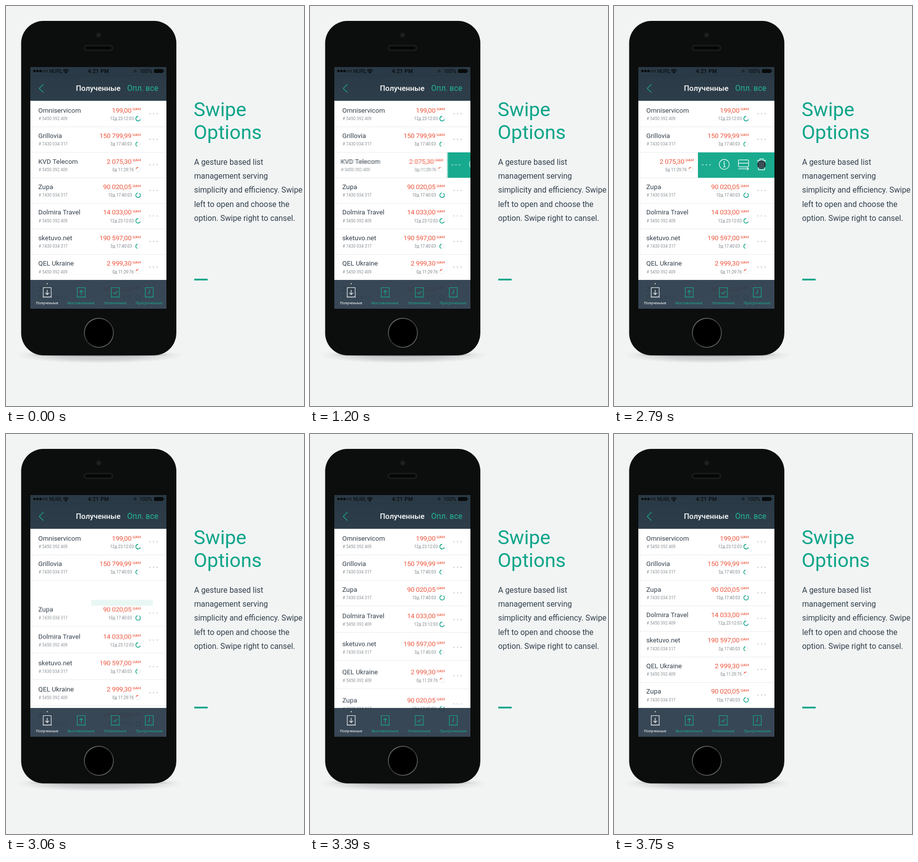
Recreate the animation shown at these times as an HTML page with a canvas. Size 600 px wide and 806 px high, loop 5310 ms.

```html
<!DOCTYPE html>
<html lang="en">
<head>
<meta charset="utf-8">
<title>Swipe Options</title>
<style>
html, body { margin: 0; width: 100%; height: 100%; overflow: hidden; background: #f2f4f4; }
canvas { display: block; width: 600px; height: 806px; }
</style>
</head>
<body>
<canvas id="stage"></canvas>
<script>
const W = 600, H = 806, LOOP = 5310, STEP = 30;
const LEFT = 49, RIGHT = 323, TOP = 191, ROW = 192, BAR = 552, BOTTOM = 610, PITCH = 51.45, SWIPE = 111;
const TEAL = '#0fa58a', GREEN = '#1aab8f', RED = '#ee5840', FONT = 'Roboto, "Open Sans", sans-serif';
const scale = window.devicePixelRatio || 1;

const makeCtx = canvas => {
  canvas.width = W * scale;
  canvas.height = H * scale;
  const c = canvas.getContext('2d');
  c.scale(scale, scale);
  return c;
};
const ctx = makeCtx(document.getElementById('stage'));
const buf = makeCtx(document.createElement('canvas'));

const clamp = x => Math.min(1, Math.max(0, x));
const span = (t, a, b) => clamp((t - a) / (b - a));
const mix = (a, b, p) => a + (b - a) * p;
const quad = u => u < .5 ? 2 * u * u : 1 - 2 * (1 - u) ** 2;
const cubic = u => u < .5 ? 4 * u ** 3 : 1 - 4 * (1 - u) ** 3;

function text(c, str, x, y, size, color, weight = 400, align = 'left', spacing = 0) {
  c.font = `${weight} ${size}px ${FONT}`;
  c.letterSpacing = spacing + 'px';
  c.textAlign = align;
  c.fillStyle = color;
  c.fillText(str, x, y);
}

function line(c, points, color, width = 1, close = false) {
  c.beginPath();
  points.forEach(([x, y]) => c.lineTo(x, y));
  if (close) c.closePath();
  c.strokeStyle = color;
  c.lineWidth = width;
  c.stroke();
}

function disc(c, x, y, r, color) {
  c.beginPath();
  c.arc(x, y, r, 0, Math.PI * 2);
  c.fillStyle = color;
  c.fill();
}

function arc(c, x, y, r, from, to, color, width) {
  c.beginPath();
  c.arc(x, y, r, from * Math.PI, to * Math.PI);
  c.strokeStyle = color;
  c.lineWidth = width;
  c.stroke();
}

function box(c, x, y, w, h, r, fill, stroke, width = 1) {
  c.beginPath();
  c.roundRect(x, y, w, h, r);
  if (fill) { c.fillStyle = fill; c.fill(); }
  if (stroke) { c.strokeStyle = stroke; c.lineWidth = width; c.stroke(); }
}

function dots(c, x, y, color) {
  for (let k = -1; k < 2; k++) disc(c, x + k * 7.3, y, 1.1, color);
}

// Time left: label, ring arc (in units of pi), ring colour
const LONG = ['12д 23:12:03', .1, 1.5, TEAL];
const MID = ['3д 17:40:03', .65, 1.4, TEAL];
const LATE = ['0д 11:29:76', 1.15, 1.5, RED];
const FULL = ['10д 17:40:03', -.3, 1.45, TEAL];
const ROWS = [
  ['Omniservicom', '199,00', LONG],
  ['Grillovia', '150 799,99', MID],
  ['KVD Telecom', '2 075,30', LATE],
  ['Zupa', '90 020,05', FULL],
  ['Dolmira Travel', '14 033,00', LONG],
  ['sketuvo.net', '190 597,00', MID],
  ['QEL Ukraine', '2 999,30', LATE],
  ['Zupa', '90 020,05', FULL]
];

function rowText(c, i, y, dx = 0, dotColor = '#b4bac0') {
  const [name, sum, [left, from, to, color]] = ROWS[i];
  const odd = i % 2;
  text(c, name, 65 + dx, y + 22.6, 13.3, '#34414d');
  text(c, odd ? '# 7430 034 317' : '# 5450 392 409', 65.6 + dx, y + 38, 8.4, '#8b9197');
  text(c, sum, 252.5 + dx, y + 22.6, 13.6, RED, 400, 'right', -.28);
  text(c, 'UAH', 255 + dx, y + 18.3, 8, RED, 500, 'left', .2);
  text(c, left, (odd ? 253.5 : 257.3) + dx, y + 38, 8.2, '#7f868c', 400, 'right');
  arc(c, 266 + dx, y + 35, 4.6, 0, 2, '#e4e8ea', 1);
  arc(c, 266 + dx, y + 35, 4.6, from, to, color, 1.6);
  dots(c, 297 + dx, y + 25.2, dotColor);
}

function infoIcon(c, x, y) {
  arc(c, x, y, 10, 0, 2, '#fff', 1.2);
  disc(c, x, y - 5, 1.2, '#fff');
  line(c, [[x - 2, y - 2], [x + .3, y - 2], [x + .3, y + 5]], '#fff', 1.3);
  line(c, [[x - 2.3, y + 5.2], [x + 2.8, y + 5.2]], '#fff', 1.1);
}

function cardIcon(c, x, y) {
  box(c, x - 10, y - 9, 20.5, 14, 1.5, null, '#fff', 1.2);
  line(c, [[x - 10, y - 2.5], [x + 10.5, y - 2.5]], '#fff', 1.2);
  line(c, [[x - 10, y + 9], [x + 10.5, y + 9]], '#fff', 1.2);
  line(c, [[x + 7, y + 6.2], [x + 10.5, y + 9], [x + 7, y + 11.8]], '#fff', 1.1);
}

function trashIcon(c, x, y, pressed) {
  line(c, [[x - 8.5, y - 8], [x + 8.5, y - 8]], '#fff', 1.2);
  line(c, [[x - 3.5, y - 8], [x - 3.5, y - 11], [x + 3.5, y - 11], [x + 3.5, y - 8]], '#fff', 1.1);
  line(c, [[x - 7, y - 8], [x - 6, y + 11], [x + 6, y + 11], [x + 7, y - 8]], '#fff', 1.2);
  if (pressed) disc(c, x, y + .5, 8.6, '#2b3b46');
  for (let k = -1; k < 2; k++)
    line(c, [[x + k * 3.4, y - 5], [x + k * 3.1, y + 8]], pressed ? '#64817f' : '#fff', 1);
}

function swipedRow(c, t) {
  const y = ROW + 2 * PITCH, low = y + PITCH;
  const slide = end => SWIPE * cubic(span(t, 1150, end));
  const dx = -slide(1410), edge = 280 + dx;
  const shown = span(t, 870, 1140), gone = span(t, 2880, 3078);
  if (gone === 1) return;

  const ink = 1 - span(t, 2880, 2990);
  c.save();
  c.globalAlpha = ink;
  rowText(c, 2, y, dx);
  line(c, [[LEFT, low], [RIGHT, low]], '#e8ebed');
  c.restore();
  if (!shown) return;

  // The open panel folds down onto its lower edge
  const fold = quad(gone);
  c.save();
  c.globalAlpha = shown * (1 - gone);
  c.translate(mix(edge, edge + 3, fold), low);
  c.scale(mix(1, .8, fold), mix(1, .22, fold));
  c.translate(-edge, -low);
  c.beginPath();
  c.rect(edge, y, RIGHT - edge, PITCH);
  c.clip();
  c.fillStyle = GREEN;
  c.fillRect(edge, y, RIGHT - edge, PITCH);
  c.globalAlpha *= ink;
  dots(c, 297 + dx, y + 25.2, '#fff');
  infoIcon(c, 222 + SWIPE - slide(1470), y + 24.2);
  cardIcon(c, 260.5 + SWIPE - slide(1525), y + 24.2);
  trashIcon(c, 297 + SWIPE - slide(1580), y + 24.2, t >= 2780);
  c.restore();
}

function list(c, t) {
  c.save();
  c.beginPath();
  c.rect(LEFT, TOP, RIGHT - LEFT, BOTTOM - TOP);
  c.clip();
  c.fillStyle = '#fff';
  c.fillRect(LEFT, TOP, RIGHT - LEFT, BOTTOM - TOP);
  ROWS.forEach((_, i) => {
    if (i === 2) return;
    const lag = 88 * (i - 3);
    const rise = i > 2 ? PITCH * quad(span(t, 2905, 3385 + lag)) : 0;
    const y = ROW + i * PITCH - rise;
    rowText(c, i, y);
    line(c, [[LEFT, y + PITCH], [RIGHT, y + PITCH]], '#e8ebed');
  });
  swipedRow(c, t);
  c.restore();
}

// Averages several moments of the list while it moves
function blurredList(t) {
  const moving = (t >= 1140 && t < 1600) || (t > 2860 && t < 3750);
  const n = moving ? 6 : 1, w = RIGHT - LEFT, h = BOTTOM - TOP;
  for (let k = 0; k < n; k++) {
    list(buf, moving ? t + (k / (n - 1) - .5) * 18 : t);
    ctx.globalAlpha = 1 / (k + 1);
    ctx.drawImage(buf.canvas, LEFT * scale, TOP * scale, w * scale, h * scale, LEFT, TOP, w, h);
  }
  ctx.globalAlpha = 1;
}

function shadow(c, y, rx, ry, alpha) {
  c.save();
  c.translate(189, y);
  c.scale(1, ry / rx);
  const shade = c.createRadialGradient(0, 0, rx * .5, 0, 0, rx);
  shade.addColorStop(0, `rgba(60,65,68,${alpha})`);
  shade.addColorStop(1, 'rgba(60,65,68,0)');
  disc(c, 0, 0, rx, shade);
  c.restore();
}

function phone(c) {
  shadow(c, 704, 168, 16, .2);
  shadow(c, 703, 150, 4, .4);
  box(c, 30.5, 30, 312.5, 674, 45, '#0c0d0d');
  disc(c, 186.5, 58.5, 6, '#161718');
  disc(c, 186.5, 58.5, 4.3, '#0a0b0b');
  arc(c, 186.5, 58.5, 2.4, 0, 2, '#3c4043', 1.2);
  box(c, 157, 79, 58, 11, 5.5, '#121313', '#242627', 1.2);
  box(c, 160, 82, 52, 5, 2.5, '#050505');

  const rim = c.createLinearGradient(160, 630, 212, 688);
  rim.addColorStop(0, '#8b8e90');
  rim.addColorStop(.5, '#3d4042');
  rim.addColorStop(1, '#7d8082');
  disc(c, 187, 658.5, 30, rim);
  disc(c, 187, 658.5, 28.5, '#000');
}

function header(c) {
  const back = c.createLinearGradient(0, 123, 0, TOP);
  back.addColorStop(0, '#293945');
  back.addColorStop(1, '#2d3e4a');
  c.fillStyle = back;
  c.fillRect(LEFT, 123, RIGHT - LEFT, TOP - 123);
  c.fillStyle = '#263540';
  c.fillRect(LEFT, 139, RIGHT - LEFT, 1);

  const ink = '#080a0b';
  for (let k = 0; k < 5; k++) {
    const x = 57.3 + k * 6;
    if (k < 3) disc(c, x, 131, 2.5, ink);
    else arc(c, x, 131, 2.1, 0, 2, ink, .8);
  }
  text(c, 'NURL', 87, 135, 10.6, ink);
  [3, 5.6, 8.2].forEach(r => arc(c, 120.5, 136, r, 1.25, 1.75, ink, 1.5));
  disc(c, 120.5, 134.5, 1.4, ink);
  text(c, '4:21 PM', 186, 135, 10.8, ink, 500, 'center', .3);
  disc(c, 260, 131, 3, '#1b262e');
  text(c, '100%', 294.5, 135, 10.6, ink, 400, 'right');
  box(c, 298.5, 127.5, 17.5, 7, 1.5, ink, ink, 1);
  box(c, 317, 129.5, 1.6, 3, .8, ink);

  line(c, [[75.5, 157.5], [66.8, 166], [75.5, 174.5]], '#1bb497', 1.1);
  text(c, 'Полученные', 185.7, 171, 15.2, '#fff', 500, 'center');
  text(c, 'Опл. все', 306.5, 171, 15.7, '#22b497', 400, 'right');
}

function receipt(c, x, color) {
  const pts = [[x + 8, 587], [x + 8, 567.5], [x - 8, 567.5], [x - 8, 587]];
  for (let k = 1; k < 8; k++) pts.push([x - 8 + k * 2, k % 2 ? 585.6 : 587.2]);
  line(c, pts, color, 1.1, true);
}

const GLYPHS = [
  x => [[[x, 572], [x, 581.5]], [[x - 3.5, 578], [x, 581.5], [x + 3.5, 578]]],
  x => [[[x, 573], [x, 582.5]], [[x - 3.5, 576.5], [x, 573], [x + 3.5, 576.5]]],
  x => [[[x - 3.5, 577.5], [x - 1, 580], [x + 4, 574.5]]],
  x => [[[x + .5, 571.5], [x + .5, 577.5], [x - 2.5, 580.5]]]
];

function tabBar(c) {
  c.fillStyle = 'rgba(41,58,73,.93)';
  c.fillRect(LEFT, BAR, RIGHT - LEFT, BOTTOM - BAR);
  disc(c, 83, 559.5, 1.1, '#fff');
  ['Полученные', 'Выставленные', 'Оплаченные', 'Просроченные'].forEach((label, i) => {
    const x = 83 + i * 68.5, color = i ? '#18ab90' : '#fff';
    receipt(c, x, color);
    GLYPHS[i](x).forEach(p => line(c, p, color, 1.2));
    text(c, label, x - .3, 600.5, 7.7, color, 400, 'center');
  });
}

function caption(c) {
  text(c, 'Swipe', 377.8, 222, 39.7, TEAL);
  text(c, 'Options', 377.8, 268, 39.7, TEAL);
  ['A gesture based list', 'management serving', 'simplicity and efficiency. Swipe',
    'left to open and choose the', 'option. Swipe right to cansel.'
  ].forEach((s, i) => text(c, s, 378.7, 320 + i * 28.2, 15.85, '#33414d'));
  c.fillStyle = TEAL;
  c.fillRect(379, 549.5, 27, 3.5);
}

function draw(t) {
  ctx.fillStyle = '#f2f4f4';
  ctx.fillRect(0, 0, W, H);
  caption(ctx);
  phone(ctx);
  blurredList(t);
  header(ctx);
  tabBar(ctx);
}

const start = performance.now();
let last = -1;
function tick() {
  const t = Math.floor(((performance.now() - start) % LOOP) / STEP) * STEP;
  if (t !== last) draw(last = t);
  requestAnimationFrame(tick);
}
tick();
</script>
</body>
</html>
```
